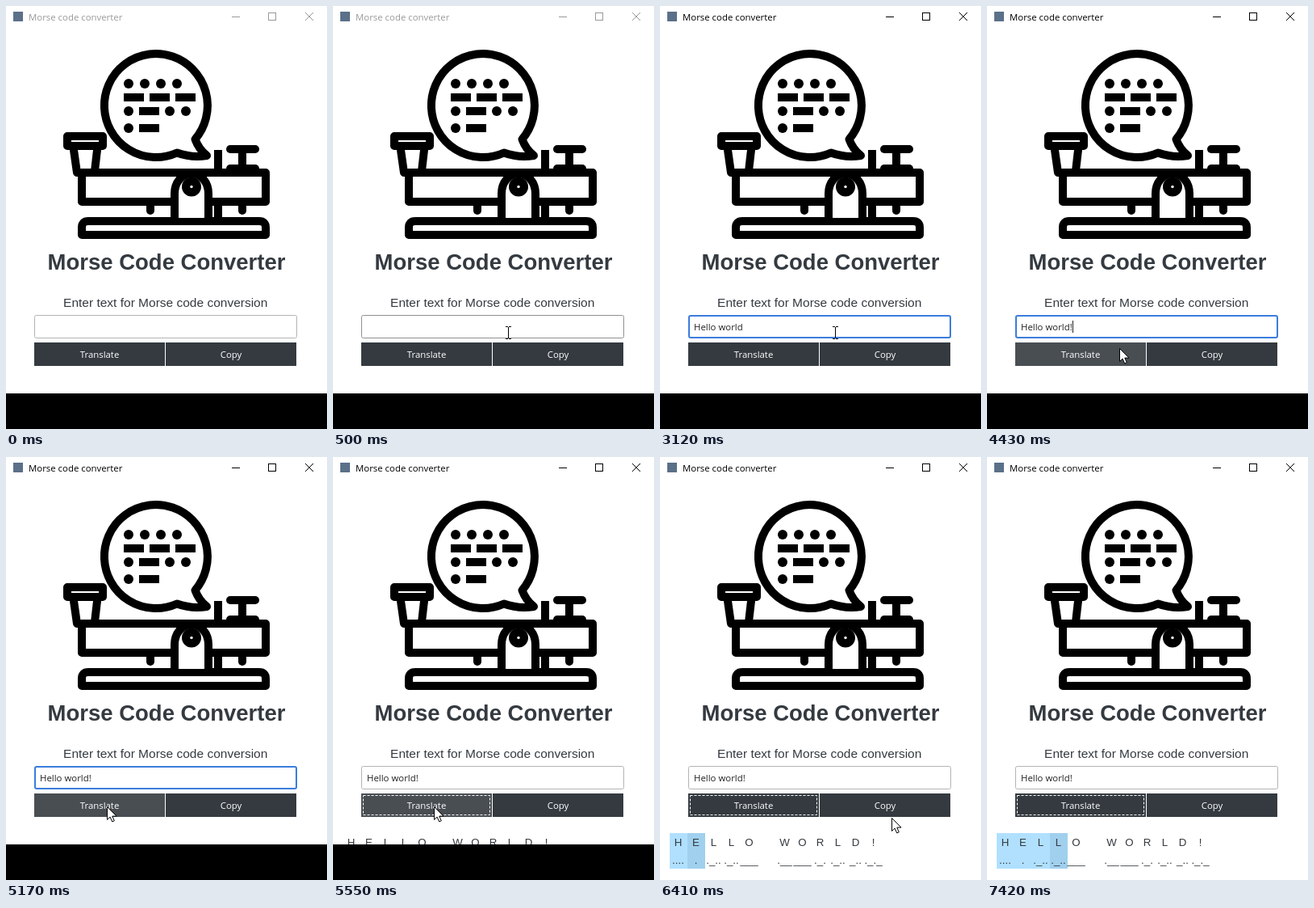
Write an HTML page with a canvas that moves like this. It is 398 px wide and 523 px high and loops after 8000 ms.

```html
<!DOCTYPE html>
<html lang="en">
<head>
<meta charset="utf-8">
<title>Morse code converter</title>
<style>
html, body { margin: 0; width: 100%; height: 100%; overflow: hidden; background: #fff; }
canvas { display: block; width: 398px; height: 523px; }
</style>
</head>
<body>
<canvas id="stage" width="398" height="523"></canvas>
<script>
const ctx = document.getElementById('stage').getContext('2d');
const LOOP = 8000;
const INK = '#343a40';
const HOVER = '#494e53';
const UI = '11.4px "Open Sans", "Noto Sans", sans-serif';
const ARIAL = '"Liberation Sans", Arial, sans-serif';

const ACTIVATE = 850, PRESS = 5380, RESULT = 5550, GROW = 5570;
const MESSAGE = 'Hello world!';
const KEY_TIMES = [1570, 1930, 2140, 2240, 2350, 2550, 2650, 2760, 2850, 2940, 3030, 3410];
const CARET_ON = [[ACTIVATE, 1360], [1570, 3120], [3410, 4010], [4390, 4910]];
const HIGHLIGHTS = [GROW, 6240, 6650, 7420];
const MORSE = {
  H: '....', E: '.', L: '._..', O: '___', W: '.__', R: '._.', D: '_..', '!': '._._'
};
// time, x, y of the pointer tip
const POINTER = [
  [140, 264, 492], [220, 220, 411], [480, 220, 411], [520, 217, 404],
  [4300, 217, 404], [4430, 164, 423], [4570, 124, 441], [4910, 124, 441],
  [5170, 125, 432], [5790, 125, 432], [6410, 287, 446], [6600, 308, 454],
  [7030, 362, 524]
];

function pointerAt(t) {
  if (t < POINTER[0][0] || t >= POINTER[POINTER.length - 1][0]) return null;
  const i = POINTER.findIndex(p => p[0] > t);
  const [t0, x0, y0] = POINTER[i - 1], [t1, x1, y1] = POINTER[i];
  const k = (t - t0) / (t1 - t0);
  return { x: Math.round(x0 + (x1 - x0) * k), y: Math.round(y0 + (y1 - y0) * k) };
}

const inside = (p, x, y, w, h) => p && p.x >= x && p.x < x + w && p.y >= y && p.y < y + h;

function fill(color, x, y, w, h) {
  ctx.fillStyle = color;
  ctx.fillRect(x, y, w, h);
}

function text(str, x, y, font, color, align = 'left') {
  ctx.font = font;
  ctx.fillStyle = color;
  ctx.textAlign = align;
  ctx.fillText(str, x, y);
}

function line(...points) {
  ctx.beginPath();
  for (let i = 0; i < points.length; i += 2) ctx.lineTo(points[i], points[i + 1]);
  ctx.stroke();
}

function dot(x, y, r, color = '#000') {
  ctx.fillStyle = color;
  ctx.beginPath();
  ctx.arc(x, y, r, 0, Math.PI * 2);
  ctx.fill();
}

function shape(path) {
  const p = new Path2D(path);
  ctx.fillStyle = '#fff';
  ctx.fill(p);
  ctx.stroke(p);
}

function drawTitleBar(active) {
  const color = active ? '#000' : '#999';
  fill('#5b7089', 9, 7, 12, 12);
  text('Morse code converter', 28, 18, UI, color);
  ctx.strokeStyle = color;
  ctx.lineWidth = 1;
  line(280, 13.5, 290, 13.5);
  ctx.strokeRect(325.5, 8.5, 9, 9);
  line(371, 8, 381, 18);
  line(381, 8, 371, 18);
}

function drawTelegraph() {
  ctx.save();
  ctx.strokeStyle = '#000';
  ctx.lineWidth = 10;
  ctx.lineCap = ctx.lineJoin = 'round';

  // cup
  line(84, 178, 88, 206);
  line(113, 178, 110, 204);
  shape('M76 161H120V173H76Z');

  // posts, feet and key
  fill('#000', 258, 178, 10, 30);
  fill('#000', 258, 242, 10, 22);
  line(179, 245, 179, 253);
  line(293, 245, 293, 253);
  line(278, 177, 309, 177);
  line(293, 177, 293, 200);
  line(278, 201, 309, 201);

  // beam, base and pivot
  shape('M94 206H322V242H94Z');
  shape('M94 283V274Q94 266 102 266H314Q322 266 322 274V283Z');
  shape('M209 262V232A21 25 0 0 1 251 232V262');
  dot(230, 223.5, 12);
  dot(230, 223.5, 1.7, '#fff');

  // speech bubble
  shape('M212 181.5A64 64 0 1 1 234.5 164.7Q239 177 249 185Q230 188 212 181.5Z');
  for (const x of [152, 172, 192, 212]) dot(x, 96, 6);
  for (const x of [146, 178, 210]) fill('#000', x, 108, 25, 10);
  for (const x of [152, 203, 223]) dot(x, 130, 6);
  dot(152, 151, 6);
  fill('#000', 165, 125, 25, 10);
  fill('#000', 165, 146, 25, 10);
  ctx.restore();
}

function drawInput(t, pointer) {
  const focused = t >= ACTIVATE && t < PRESS;
  const hovered = inside(pointer, 35, 382, 326, 29);
  const w = focused ? 2 : 1;
  ctx.strokeStyle = focused ? '#3c7ddd' : hovered ? '#909090' : '#b4b4b4';
  ctx.lineWidth = w;
  ctx.beginPath();
  ctx.roundRect(35 + w / 2, 382 + w / 2, 326 - w, 29 - w, 2);
  ctx.stroke();

  const typed = MESSAGE.slice(0, KEY_TIMES.filter(k => k <= t).length);
  text(typed, 42, 401, UI, '#222');
  if (CARET_ON.some(([from, to]) => t >= from && t < to)) {
    const x = typed ? Math.round(42.5 + ctx.measureText(typed).width) : 42;
    fill('#222', x, 389, 1, 15);
  }
}

function drawButton(label, x, pointer, focused) {
  fill(inside(pointer, x, 416, 162, 29) ? HOVER : INK, x, 416, 162, 29);
  text(label, x + 81, 435, UI, '#fff', 'center');
  if (!focused) return;
  ctx.strokeStyle = '#fff';
  ctx.lineWidth = 1;
  ctx.setLineDash([3, 2]);
  ctx.strokeRect(x + 2.5, 418.5, 157, 24);
  ctx.setLineDash([]);
}

function drawResult(t) {
  const count = HIGHLIGHTS.filter(h => h <= t).length;
  if (count) {
    fill('#b0e0fe', 12, 465, 22 * count, 44);
    fill('#a0d0ee', 12 + 22 * (count - 1), 465, 22, 44);
  }
  const font = '13.33px ' + ARIAL;
  [...MESSAGE.toUpperCase()].forEach((letter, i) => {
    const x = 22.5 + 22 * i;
    text(letter, x, 481, font, INK, 'center');
    text(MORSE[letter] || '', x, 502.5, font, INK, 'center');
  });
}

function drawPointer(p) {
  ctx.lineWidth = 1;
  ctx.strokeStyle = '#000';
  if (inside(p, 35, 382, 326, 29)) {
    line(217.5, 397, 217.5, 411);
    for (const y of [396.5, 411.5]) {
      line(214, y, 217, y);
      line(218, y, 221, y);
    }
    return;
  }
  ctx.save();
  ctx.translate(p.x + 0.5, p.y + 0.5);
  shape('M0 0V16L3.6 12.6L6.2 18.4L8.8 17.3L6.3 11.6H11.5Z');
  ctx.restore();
}

function draw(t) {
  const pointer = pointerAt(t);
  fill('#fff', 0, 0, 398, 523);
  drawTitleBar(t >= ACTIVATE);
  drawTelegraph();
  text('Morse Code Converter', 199, 326, 'bold 27.5px ' + ARIAL, INK, 'center');
  text('Enter text for Morse code conversion', 197.7, 372, '15.5px ' + ARIAL, INK, 'center');
  drawInput(t, pointer);
  drawButton('Translate', 35, pointer, t >= PRESS);
  drawButton('Copy', 198, pointer, false);
  if (t >= RESULT) drawResult(t);
  if (t < GROW) fill('#000', 0, 479, 398, 44);
  if (pointer) drawPointer(pointer);
}

const start = performance.now();
function tick() {
  draw((performance.now() - start) % LOOP);
  requestAnimationFrame(tick);
}
tick();
</script>
</body>
</html>
```
